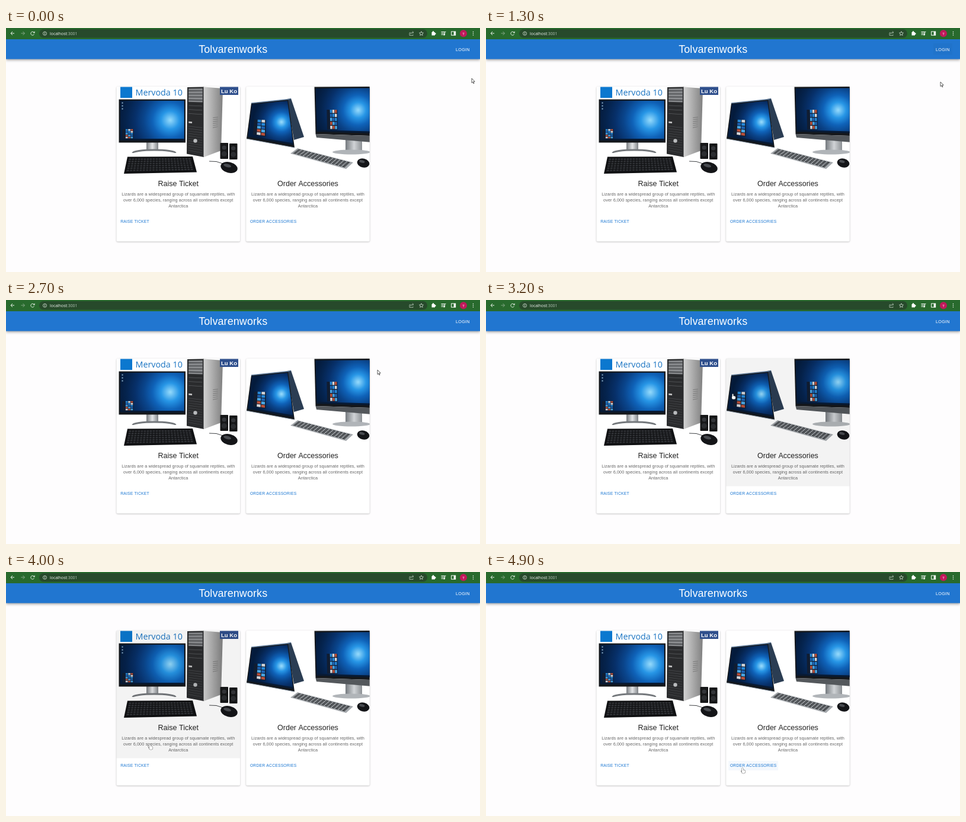
An HTML page with a canvas that plays this animation: 800x412 px, repeating every 5000 ms.

```html
<!DOCTYPE html>
<html lang="en">
<head>
<meta charset="utf-8">
<title>Shop front</title>
<style>
  html, body { margin: 0; width: 100%; height: 100%; overflow: hidden; background: #fefdfe; }
  canvas { display: block; width: 800px; height: 412px; }
</style>
</head>
<body>
<canvas id="stage" width="800" height="412"></canvas>
<script>
const LOOP = 5000, STEP = 100;
const SANS = '"Liberation Sans", Arial, sans-serif';
const HUMAN = '"Open Sans", "Noto Sans", sans-serif';

const stage = document.getElementById('stage').getContext('2d');
const scene = document.createElement('canvas');
scene.width = 800;
scene.height = 412;
const g = scene.getContext('2d');

const mix = (a, b, k) => a + (b - a) * k;
const times = (n, fn) => { for (let i = 0; i < n; i++) fn(i); };

function rect(color, x, y, w, h, r = 0) {
  g.fillStyle = color;
  g.beginPath();
  g.roundRect(x, y, w, h, r);
  g.fill();
}

function trace(c, pts) {
  c.beginPath();
  for (let i = 0; i < pts.length; i += 2) c.lineTo(pts[i], pts[i + 1]);
}

function poly(color, ...pts) {
  trace(g, pts);
  g.fillStyle = color;
  g.fill();
}

function line(color, width, ...pts) {
  trace(g, pts);
  g.strokeStyle = color;
  g.lineWidth = width;
  g.stroke();
}

function oval(color, x, y, rx, ry = rx, turn = 0) {
  g.fillStyle = color;
  g.beginPath();
  g.ellipse(x, y, rx, ry, turn, 0, 7);
  g.fill();
}

function ring(color, x, y, r, from = 0, to = 7) {
  g.strokeStyle = color;
  g.lineWidth = 0.9;
  g.beginPath();
  g.arc(x, y, r, from, to);
  g.stroke();
}

function text(str, x, y, size, color, { align = 'left', font = SANS, space = 0, weight = 400 } = {}) {
  g.font = `${weight} ${size}px ${font}`;
  g.letterSpacing = space * size + 'px';
  g.textAlign = align;
  g.fillStyle = color;
  g.fillText(str, x, y);
}

function sheen(x0, x1, ...colors) {
  const grad = g.createLinearGradient(x0, 0, x1, 0);
  colors.forEach((c, i) => grad.addColorStop(i / (colors.length - 1), c));
  return grad;
}

function withShadow(color, blur, dy, draw) {
  g.save();
  g.shadowColor = color;
  g.shadowBlur = blur;
  g.shadowOffsetY = dy;
  draw();
  g.restore();
}

// A flat face in perspective: corners clockwise from top left, cells in 0..1
function face(ax, ay, bx, by, cx, cy, dx, dy) {
  const at = (u, v) => [
    mix(mix(ax, bx, u), mix(dx, cx, u), v),
    mix(mix(ay, by, u), mix(dy, cy, u), v)
  ];
  const cell = (color, u = 0, v = 0, w = 1, h = 1) =>
    poly(color, ...at(u, v), ...at(u + w, v), ...at(u + w, v + h), ...at(u, v + h));
  return { at, cell };
}

// Lit desktop: a soft light, a tiled menu and a task bar
function desktop({ at, cell }, menuU, menuV, menuW, menuH, cols) {
  cell('#14171b');
  const [x, y] = at(0.77, 0.48);
  const radius = (at(1, 0)[0] - at(0, 0)[0]) * 0.78;
  const glow = g.createRadialGradient(x, y, 1, x, y, radius);
  ['#8fd6fa', '#2796e6', '#0f62b8', '#0a458c', '#07306a', '#05244f', '#041b3c']
    .forEach((c, i, all) => glow.addColorStop(i / (all.length - 1), c));
  cell(glow, 0.02, 0.03, 0.96, 0.91);
  cell('#081a33', 0.02, 0.91, 0.96, 0.04);
  cell('#111d31', menuU, menuV, menuW, menuH);
  const tints = ['#2488d8', '#49a7e4', '#d4d6da', '#1c62b2', '#b9503a'];
  const w = menuW * 0.68 / cols, h = menuH / 5;
  times(5, r => times(cols, c =>
    cell(tints[(r * 3 + c * 2) % 5], menuU + menuW * 0.3 + c * w, menuV + r * h, w * 0.85, h * 0.8)));
}

function keyboard({ cell }, base, key, rows, cols) {
  cell(base);
  times(rows, r => times(cols, c =>
    cell(key, 0.03 + 0.94 * c / cols, 0.1 + 0.8 * r / rows, 0.7 / cols, 0.55 / rows)));
}

function mouse(x, y, rx, ry) {
  oval('#141518', x, y, rx, ry, 0.25);
  oval('#484b50', x - rx * 0.2, y - ry * 0.35, rx * 0.45, ry * 0.3, 0.25);
}

function tower() {
  const side = face(334, 99.5, 366, 102, 363, 207, 334, 218);
  side.cell(sheen(334, 366, '#d0d0d0', '#a9a9a9', '#808080'));
  times(6, i => side.cell('#777', 0.5, 0.45 + i * 0.03, 0.28, 0.008));
  const front = face(306, 100, 334, 99.5, 334, 218, 305, 212.5);
  front.cell('#2a2b2d');
  front.cell('#85878a', 0.08, 0.02, 0.84, 0.2);
  times(4, i => front.cell('#35373a', 0.08, 0.05 + i * 0.045, 0.84, 0.009));
  times(3, i => front.cell('#5b5d60', 0.1, 0.27 + i * 0.06, 0.8, 0.007));
  front.cell('#c4c4c4', 0.1, 0.51, 0.2, 0.025);
  times(11, i => front.cell('#4a4c4f', 0.1, 0.58 + i * 0.036, 0.8, 0.006));
  oval('#b9bbbd', 319.5, 190.5, 3.2);
  line('#dedede', 0.9, 334, 100, 334, 217.5);
}

function ticketPicture() {
  rect('#0b78cf', 193, 99.5, 20, 18.5);
  text('Mervoda 10', 218.5, 114, 14.3, '#1a74c2', { font: HUMAN });

  rect(sheen(236, 258, '#6f7378', '#e4e6e8', '#777b80'), 237, 192, 20, 15);
  g.strokeStyle = '#74787c';
  g.lineWidth = 3;
  g.beginPath();
  g.ellipse(250, 211, 36, 5, 0, Math.PI, 0);
  g.stroke();
  desktop(face(190.5, 120.5, 303, 120.5, 303, 193.5, 190.5, 193.5), 0.05, 0.69, 0.17, 0.22, 3);
  times(3, i => rect('#8fb3d0', 195.5, 125.5 + i * 5, 2, 2));

  tower();
  rect('#2f4f8c', 361, 99.5, 31, 13.5);
  text('Lu Ko', 376.5, 109.8, 9.5, '#fff', { align: 'center', weight: 700 });

  times(2, i => {
    const x = 361.5 + i * 15.5, y = 194 + i;
    rect('#161718', x, y, 13.5, 27, 1);
    oval('#34363a', x + 6.7, y + 8, 3.6);
    oval('#2b2d30', x + 6.7, y + 18.5, 4.4);
  });
  keyboard(face(205, 217.5, 315, 217, 322, 243.5, 199, 246), '#101113', '#2f3135', 6, 21);
  line('#2c2e31', 0.9, 366, 229, 355, 225.5, 343, 225);
  mouse(376.5, 235.5, 14.5, 9);
}

function accessoryPicture() {
  // folded laptop
  face(474, 120, 481, 119, 503, 184, 486, 189).cell('#2b3d53');
  const lid = face(414, 127, 476, 120.5, 487, 202, 406, 187);
  desktop(lid, 0.12, 0.45, 0.28, 0.41, 2);
  line('#5f7c9c', 1.3, ...lid.at(0, 0), ...lid.at(1, 0), 481, 119);
  line('#8c9aaa', 0.9, ...lid.at(0, 1), ...lid.at(1, 1));

  // all-in-one
  rect(sheen(573, 602, '#74797e', '#d0d3d6', '#888c90'), 573, 186, 28, 21);
  oval('#b0b4b8', 583, 209.5, 32, 4);
  desktop(face(520.5, 99.5, 616, 99, 616, 182, 522.5, 179), 0.21, 0.48, 0.19, 0.42, 3);
  face(522.5, 179, 616, 182, 616, 193, 524, 185).cell('#54585c');

  keyboard(face(492, 203, 586, 227, 574, 238, 480, 212), '#a5a9ad', '#2b2e32', 5, 15);
  mouse(603, 228, 10.5, 7.5);
}

const cards = [
  { x: 186.5, title: 'Raise Ticket', action: 'RAISE TICKET', width: 54, picture: ticketPicture },
  { x: 405.2, title: 'Order Accessories', action: 'ORDER ACCESSORIES', width: 84, picture: accessoryPicture }
];
const CARD_W = 208.5, CARD_Y = 99;
const blurb = [
  'Lizards are a widespread group of squamate reptiles, with',
  'over 6,000 species, ranging across all continents except',
  'Antarctica'
];

function drawCard({ x, title, action, picture }) {
  withShadow('rgba(0,0,0,.28)', 2.5, 0.8, () => rect('#fff', x, CARD_Y, CARD_W, 261.5, 2));
  g.save();
  g.beginPath();
  g.rect(x, CARD_Y, CARD_W, 147);
  g.clip();
  picture();
  g.restore();
  const mid = x + CARD_W / 2;
  text(title, mid, 266.8, 12.5, '#212121', { align: 'center' });
  blurb.forEach((row, i) =>
    text(row, mid, 282.6 + i * 10.42, 7.29, '#666', { align: 'center', space: 0.0107 }));
  text(action, x + 6.7, 329.3, 6.77, '#1976d2', { space: 0.0286 });
}

function browserBar() {
  const ink = '#e9f1e9', dim = '#b7c8b8';
  rect('#286a2d', 0, 0, 800, 19);
  rect('#274a2b', 56, 2, 655, 14.5, 7.2);
  const arrow = (color, x, dir) => {
    line(color, 1, x - 3 * dir, 9, x + 3 * dir, 9);
    line(color, 1, x, 6, x + 3 * dir, 9, x, 12);
  };
  arrow(ink, 11, -1);
  arrow('#86a888', 28.5, 1);
  ring(ink, 44.8, 9.2, 3, 0.4, 5.6);
  poly(ink, 48.6, 5.4, 48.6, 8.6, 45.4, 8.6);
  ring('#cfdccf', 65.5, 9.3, 3);
  rect('#cfdccf', 65.1, 8.8, 0.9, 2.2);
  rect('#cfdccf', 65.1, 7.3, 0.9, 0.9);
  text('localhost', 74, 12, 6.9, '#f3f7f3', { font: HUMAN });
  text(':3001', 74 + g.measureText('localhost').width, 12, 6.9, '#b9c8ba', { font: HUMAN });

  line(dim, 0.8, 683, 8, 681, 8, 681, 12.5, 687, 12.5, 687, 11);
  line(dim, 0.8, 683, 10.5, 684, 8, 687.5, 7.5);
  line(dim, 0.8, 685.8, 5.5, 688, 7.5, 685.8, 9.5);
  const star = [];
  times(11, i => {
    const a = i * Math.PI / 5 - Math.PI / 2, r = i % 2 ? 1.7 : 3.7;
    star.push(701 + r * Math.cos(a), 9.4 + r * Math.sin(a));
  });
  line('#d5e0d5', 0.8, ...star);
  rect('#fff', 718.5, 7, 5.5, 5.5, 0.6);
  oval('#fff', 721, 6.7, 1.4);
  oval('#fff', 724.2, 9.7, 1.4);
  times(3, i => rect('#fff', 734.5, 6 + i * 2.3, i < 2 ? 6 : 3.5, 1));
  oval('#fff', 739.6, 11.2, 1.3);
  line('#fff', 0.9, 740.6, 11, 740.6, 6.5, 742.5, 6.5);
  g.lineWidth = 1;
  g.strokeRect(751.7, 6, 7, 6.2);
  rect('#fff', 755.7, 6, 3, 6.2);
  oval('#c2185b', 772, 9.3, 6);
  text('T', 772, 11.5, 6, '#fff', { align: 'center' });
  times(3, i => oval('#fff', 788.5, 6.5 + i * 2.7, 0.75));
}

function paintScene() {
  rect('#fefdfe', 0, 0, 800, 412);
  withShadow('rgba(0,0,0,.4)', 4.5, 1.2, () => rect('#2176d0', 0, 18, 800, 34.5));
  browserBar();
  text('Tolvarenworks', 383.2, 41.8, 17.9, '#fff', { align: 'center', space: 0.0074 });
  text('LOGIN', 759, 38.5, 7.29, '#fff', { space: 0.0286 });
  cards.forEach(drawCard);
}

// Pointer stops: time, x, y
const stops = [
  [0, 786, 85], [600, 787, 53], [900, 772, 38], [1200, 772, 40], [1300, 767, 91], [2100, 767, 91],
  [2700, 627, 118], [3600, 266, 188], [4200, 235, 327], [4400, 235, 327], [4900, 433, 331]
];

function pointer(t) {
  const i = stops.findIndex(s => s[0] > t);
  if (i < 0) return stops.at(-1).slice(1);
  const [t0, x0, y0] = stops[i - 1], [t1, x1, y1] = stops[i];
  const k = (t - t0) / (t1 - t0), ease = k * k * (3 - 2 * k);
  return [mix(x0, x1, ease), mix(y0, y1, ease)];
}

// Hover areas
const GREY = 'rgba(0,0,0,.048)', TINT = 'rgba(25,118,210,.06)';
const areas = [
  { x: 755, y: 26, w: 32, h: 19, color: GREY },
  ...cards.flatMap(({ x, width }) => [
    { x, y: CARD_Y, w: CARD_W, h: 215.5, color: GREY },
    { x: x + 4, y: 319, w: width, h: 16, color: TINT }
  ])
];

const inside = ({ x, y, w, h }, [px, py]) => px >= x && px <= x + w && py >= y && py <= y + h;

// Fades in and out over 250 ms
function hoverLevel(area, t) {
  let level = 0;
  for (let s = 0; s <= t; s += STEP)
    level = Math.min(1, Math.max(0, level + (inside(area, pointer(s)) ? 0.4 : -0.4)));
  return level;
}

function drawPointer([x, y], hand) {
  stage.save();
  stage.translate(x, y);
  stage.fillStyle = '#fff';
  stage.strokeStyle = '#333';
  stage.lineWidth = 0.8;
  if (hand) {
    const shape = new Path2D();
    shape.roundRect(-0.9, -0.2, 1.8, 6, 0.9);
    shape.roundRect(-1.5, 3.4, 6, 5.4, 1.8);
    stage.stroke(shape);
    stage.fill(shape);
    stage.beginPath();
    stage.moveTo(-1.6, 6.5);
    stage.lineTo(-2.8, 4.8);
    stage.stroke();
  } else {
    trace(stage, [0, 0, 0, 7.6, 1.7, 6, 2.9, 8.8, 4.1, 8.3, 2.9, 5.6, 5.2, 5.4]);
    stage.closePath();
    stage.fill();
    stage.stroke();
  }
  stage.restore();
}

function render(t) {
  const pos = pointer(t);
  stage.drawImage(scene, 0, 0);
  for (const area of areas) {
    stage.globalAlpha = hoverLevel(area, t);
    stage.fillStyle = area.color;
    stage.fillRect(area.x, area.y, area.w, area.h);
  }
  stage.globalAlpha = 1;
  drawPointer(pos, areas.some(a => inside(a, pos)));
}

paintScene();
const start = performance.now();
function tick() {
  const t = (performance.now() - start) % LOOP;
  render(Math.floor(t / STEP) * STEP);
  requestAnimationFrame(tick);
}
tick();
</script>
</body>
</html>
```
